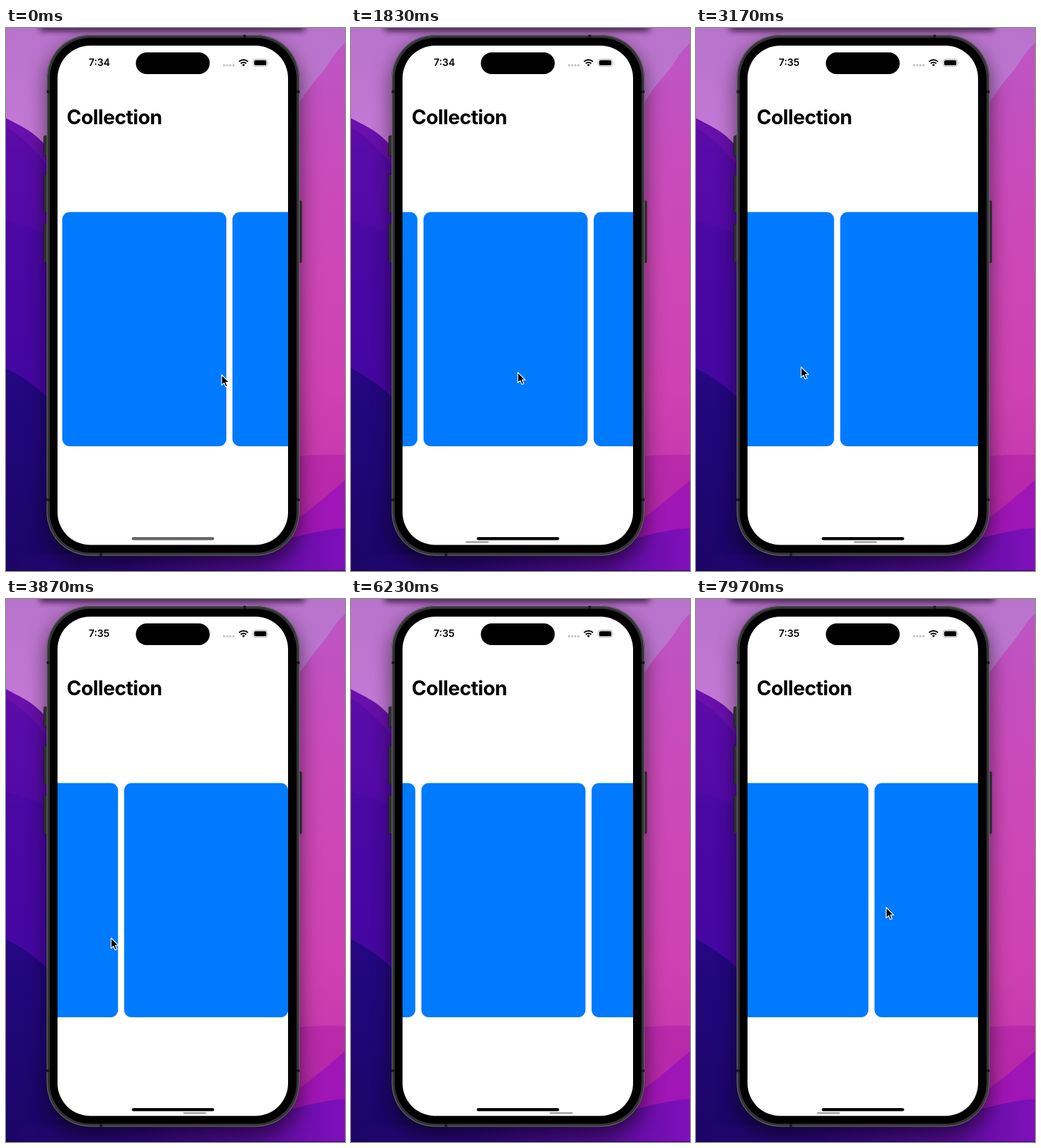
An HTML page for the animation above (8000 ms loop, 500 by 801 pixels).

```html
<!DOCTYPE html>
<html lang="en">
<head>
<meta charset="utf-8">
<title>Collection</title>
<style>
  html, body { margin: 0; width: 100%; height: 100%; overflow: hidden; background: #1c0560; }
  svg { display: block; width: 100vw; height: 100vh; }
  text { font-family: Inter, Roboto, sans-serif; }
</style>
</head>
<body>
<svg viewBox="0 0 500 801" xmlns="http://www.w3.org/2000/svg">
  <defs>
    <linearGradient id="sky" x2="0" y2="1">
      <stop offset="0" stop-color="#b873cb"/><stop offset=".4" stop-color="#cf7ee0"/><stop offset="1" stop-color="#c678dc"/>
    </linearGradient>
    <linearGradient id="violet" x2="0" y2="1">
      <stop offset="0" stop-color="#6b10ac"/><stop offset=".45" stop-color="#5109a6"/><stop offset="1" stop-color="#4208a0"/>
    </linearGradient>
    <linearGradient id="navy" x2="0" y2="1">
      <stop offset="0" stop-color="#250783"/><stop offset="1" stop-color="#1b0566"/>
    </linearGradient>
    <linearGradient id="pink" x2="0" y2="1">
      <stop offset="0" stop-color="#bd55c4"/><stop offset=".3" stop-color="#cb49b9"/>
      <stop offset=".65" stop-color="#cf42b2"/><stop offset="1" stop-color="#bd2ea8"/>
    </linearGradient>
    <linearGradient id="floor">
      <stop offset="0" stop-color="#1b0566"/><stop offset=".35" stop-color="#2a077a"/>
      <stop offset=".75" stop-color="#5a0c9e"/><stop offset="1" stop-color="#8010bb"/>
    </linearGradient>
    <filter id="soft" x="-30%" y="-30%" width="160%" height="160%"><feGaussianBlur stdDeviation="15"/></filter>
    <filter id="edge" x="-20%" y="-200%" width="140%" height="500%"><feGaussianBlur stdDeviation="5"/></filter>
    <clipPath id="screen"><rect x="76" y="26" width="340" height="736.5" rx="48"/></clipPath>
  </defs>

  <!-- wallpaper -->
  <rect width="500" height="801" fill="url(#sky)"/>
  <path d="M0 133C22 145 42 152 62 178L250 300V801H0Z" fill="url(#violet)"/>
  <path d="M0 147C24 160 42 180 62 204L250 330V801H0Z" fill="#4506a4" opacity=".4"/>
  <path d="M0 284C24 290 44 298 62 304L250 340V801H0Z" fill="#3c069c" opacity=".35"/>
  <path d="M0 502C24 514 44 528 62 546L250 620V801H0Z" fill="url(#navy)"/>
  <path d="M500 22C484 36 478 52 464 68C450 84 440 98 430 114L250 260V801H500Z" fill="url(#pink)"/>
  <path d="M250 640L430 632Q470 628 500 630V801H250Z" fill="#b020a8" opacity=".6"/>
  <path d="M250 770L430 724C455 706 475 688 500 667V801H250Z" fill="#a015b5"/>
  <path d="M0 776H330L430 750C455 744 480 738 500 738V801H0Z" fill="url(#floor)"/>
  <rect x="50" y="-14" width="390" height="18" fill="#221028" opacity=".85" filter="url(#edge)"/>
  <rect y="800" width="500" height="1" fill="#10032e" opacity=".6"/>

  <!-- phone -->
  <rect x="60" y="22" width="373" height="770" rx="62" opacity=".55" filter="url(#soft)"/>
  <g fill="#303032" stroke="#18181a" stroke-width=".8">
    <rect x="55.8" y="159" width="6" height="30" rx="1.5"/>
    <rect x="55.8" y="216" width="6" height="57" rx="1.5"/>
    <rect x="55.8" y="289" width="6" height="57" rx="1.5"/>
    <rect x="430" y="255" width="6" height="91" rx="1.5"/>
  </g>
  <rect x="60" y="10" width="373" height="768.5" rx="64" fill="#343436"/>
  <rect x="60.6" y="10.6" width="371.8" height="767.3" rx="63.4" fill="none" stroke="#6a6a6d" stroke-width="1"/>
  <path d="M60 94h5M428 94h5M60 696h5M428 696h5M352 10v5M140 774v5" stroke="#1c1c1e" stroke-width="4"/>
  <rect x="64.5" y="14.5" width="364" height="759.5" rx="60"/>
  <rect x="76" y="26" width="340" height="736.5" rx="48" fill="#fff"/>

  <!-- screen -->
  <g clip-path="url(#screen)">
    <g id="cards" fill="#007aff"></g>
    <rect id="home" x="185.5" y="751" width="121.5" height="4.6" rx="2.3"/>
    <rect id="bar" y="757" width="34" height="2.7" rx="1.35" fill="#a6a6a6"/>
  </g>
  <rect x="191.5" y="36" width="109" height="32" rx="16"/>
  <text id="clock" x="122" y="56.3" font-size="14.6" font-weight="600"></text>
  <text x="89.5" y="142" font-size="29.4" font-weight="700" letter-spacing="-.5">Collection</text>
  <g fill="#c2c2c5">
    <circle cx="321.6" cy="55" r="1.7"/><circle cx="326.2" cy="55" r="1.7"/>
    <circle cx="330.8" cy="55" r="1.7"/><circle cx="335.4" cy="55" r="1.7"/>
  </g>
  <g fill="none" stroke="#000" stroke-width="2">
    <path d="M343.7 49.6a9.4 9.4 0 0 1 13.2 0M346.2 52.3a5.9 5.9 0 0 1 8.2 0"/>
    <path d="M350.3 56.6l-2.2-2.3a3.2 3.2 0 0 1 4.4 0z" fill="#000" stroke="none"/>
  </g>
  <rect x="364.5" y="46" width="21" height="10.6" rx="3.4" fill="none" stroke="#a5a5a8" stroke-width=".9"/>
  <rect x="366" y="47.5" width="18" height="7.6" rx="2.2"/>
  <path d="M387 49.7q1.6 1.6 0 3.3z" fill="#a5a5a8"/>

  <path id="cursor" d="M0 0V15.4L3.6 12.1L6 17.7L8.6 16.6L6.3 11.1H11Z" stroke="#fff" stroke-width="1.2" stroke-linejoin="round"/>
</svg>
<script>
const LOOP = 8000, PITCH = 251, TAU = 500;
const $ = id => document.getElementById(id);
const clamp = v => Math.max(0, Math.min(1, v));

// pointer moves; those with a rest offset are flicks that drag the cards
const start = { x: 318, y: 511.5 };
const moves = [
  { from: 230, to: 406, x: 246, y: 508, rest: 503 },
  { from: 1900, to: 2400, x: 342.5, y: 506 },
  { from: 2566, to: 2789, x: 155, y: 500, rest: 1509.5 },
  { from: 4600, to: 5000, x: 186.5, y: 489 },
  { from: 5150, to: 5300, x: 82, y: 484, rest: 1760 },
  { from: 5880, to: 6150, x: -20, y: 476 },
  { from: 6300, to: 6460, x: 90, y: 460 },
  { from: 6470, to: 6640, x: 280.5, y: 455, rest: 499 }
];

const cards = Array.from({ length: 10 }, (_, i) =>
  `<rect x="${83 + i * PITCH}" y="271.5" width="242" height="345.5" rx="11"/>`);
$('cards').innerHTML = cards.join('');

function pose(t) {
  let { x, y } = start, offset = 0, rest = 0, freeSince = 0;
  const glide = at => rest + (offset - rest) * Math.exp((freeSince - at) / TAU);
  for (const m of moves) {
    if (t < m.from) break;
    const p = clamp((t - m.from) / (m.to - m.from));
    const k = m.rest ? p * p : p * p * (3 - 2 * p);
    const dx = (m.x - x) * k;
    if (m.rest) {
      offset = glide(m.from) - dx;
      rest = p < 1 ? offset : m.rest;
      freeSince = m.to;
    }
    x += dx;
    y += (m.y - y) * k;
  }
  return { x, y, offset: glide(t) };
}

function draw(t) {
  const { x, y, offset } = pose(t);
  $('cards').setAttribute('transform', `translate(${-offset} 0)`);
  $('cursor').setAttribute('transform', `translate(${x} ${y})`);
  $('bar').setAttribute('x', 122 + offset * 0.0985);
  $('bar').setAttribute('opacity', clamp((t - 230) / 100));
  const grey = Math.round(100 * (1 - clamp((t - 230) / 270)));
  $('home').setAttribute('fill', `rgb(${grey},${grey},${grey})`);
  $('clock').textContent = t < 2550 ? '7:34' : '7:35';
}

const began = performance.now();
function tick() {
  draw((performance.now() - began) % LOOP);
  requestAnimationFrame(tick);
}
tick();
</script>
</body>
</html>
```
